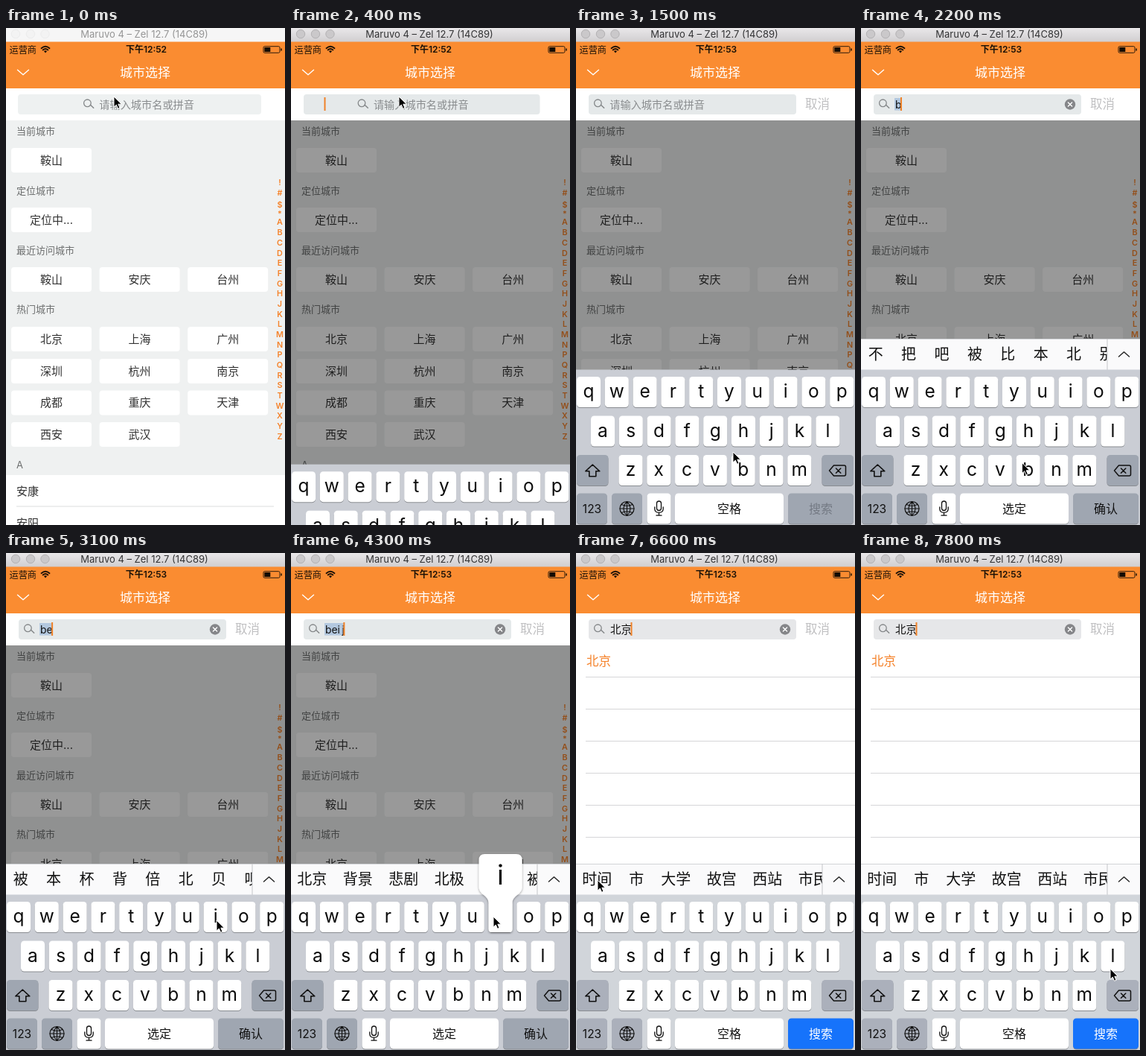
Write an HTML page that moves like this. It is 375 by 667 pixels and loops after 8 s.

```html
<!DOCTYPE html>
<html lang="zh-CN">
<head>
<meta charset="utf-8">
<title>城市选择</title>
<style>
html, body { margin: 0; width: 100%; height: 100%; overflow: hidden; background: #fff; }
svg { display: block; width: 375px; height: 667px; }
text { font-family: Inter, "Noto Sans CJK SC", "Noto Sans CJK", sans-serif; white-space: pre; }
</style>
</head>
<body>
<svg id="stage" viewBox="0 0 375 667">
  <defs>
    <linearGradient id="bar" x2="0" y2="1">
      <stop offset="0" stop-color="#e9e7e9"/><stop offset="1" stop-color="#d0ced0"/>
    </linearGradient>
    <clipPath id="candClip"><rect x="0" y="417" width="331" height="42"/></clipPath>
    <filter id="soft" x="-30%" y="-30%" width="160%" height="160%">
      <feDropShadow dx="0" dy="1" stdDeviation="1.6" flood-opacity=".4"/>
    </filter>
  </defs>
</svg>
<script>
const stage = document.getElementById('stage');
const LOOP = 8000, STEP = 100, FOCUS = 300, COMMIT = 6500;
const ORANGE = '#f5822a';

function el(tag, attrs, parent = stage) {
  const node = document.createElementNS('http://www.w3.org/2000/svg', tag);
  set(node, attrs);
  parent.appendChild(node);
  return node;
}
function set(node, attrs) {
  for (const k in attrs) node.setAttribute(k, attrs[k]);
}
const show = (node, on) => node.setAttribute('visibility', on ? 'visible' : 'hidden');
const group = (parent, attrs = {}) => el('g', attrs, parent);
const rect = (x, y, width, height, fill, parent, rx = 0) =>
  el('rect', { x, y, width, height, fill, rx }, parent);
const line = (d, stroke, width, parent) =>
  el('path', { d, stroke, 'stroke-width': width, fill: 'none', 'stroke-linecap': 'round', 'stroke-linejoin': 'round' }, parent);
// y is the visual centre of the line
function label(str, x, y, size, fill, parent, anchor = 'start', weight = 400) {
  const node = el('text', {
    x, y: y + size * 0.37, 'font-size': size, fill, 'text-anchor': anchor, 'font-weight': weight
  }, parent);
  node.textContent = str;
  return node;
}

// City list
const cities = group();
rect(0, 124, 375, 543, '#eff1f1', cities);
[['当前城市', 138], ['定位城市', 218], ['最近访问城市', 298], ['热门城市', 377.5], ['A', 586]]
  .forEach(([s, y]) => label(s, 14, y, 13, '#6c6e6e', cities));
[
  [161, '鞍山'], [241, '定位中...'], [321, '鞍山', '安庆', '台州'],
  [401, '北京', '上海', '广州'], [444, '深圳', '杭州', '南京'],
  [486.5, '成都', '重庆', '天津'], [529, '西安', '武汉']
].forEach(([y, ...names]) => names.forEach((name, i) => {
  const x = 7 + i * 118.6;
  rect(x, y, 108, 33, '#fff', cities, 4);
  label(name, x + 54, y + 16.4, 15, '#333', cities, 'middle');
}));
rect(0, 600, 375, 67, '#fff', cities);
rect(14, 641.5, 346, 1, '#dcdede', cities);
label('安康', 14, 621, 15, '#333', cities);
label('安阳', 14, 664, 15, '#333', cities);
const indexMark = (s, y) => label(s, 368, y, 10.8, ORANGE, cities, 'middle', 600);
[['!', 207], ['#', 221], ['$', 237], ['*', 249]].forEach(([s, y]) => indexMark(s, y));
[...'ABCDEFGHJKLMNPQRSTWXYZ'].forEach((s, i) => indexMark(s, 260.5 + i * 13.67));
const dim = rect(0, 124, 375, 543, '#000', cities);

// Search result
const results = group();
rect(0, 124, 375, 543, '#fff', results);
label('北京', 14, 145, 16.5, ORANGE, results);
for (let i = 0; i < 6; i++) rect(13, 166 + i * 43, 362, 1, '#d6d6d8', results);

// Title bar
const titleBar = rect(0, 0, 375, 19, '#f6f6f6');
const lights = [13, 33, 52.5].map(cx => el('circle', { cx, cy: 8, r: 5.7 }));
const titleText = label('Maruvo 4 – Zel 12.7 (14C89)', 186, 8.5, 13, '#999', stage, 'middle');

// Navigation bar
rect(0, 18.5, 375, 62.5, '#fa8c31');
label('运营商', 4.5, 29, 12.2, '#1c1208');
const clock = label('', 188.5, 29, 12, '#1c1208', stage, 'middle', 600);
line('M47.5 27.2Q53 22.4 58.5 27.2M49.6 29.5Q53 26.6 56.4 29.5', '#1c1208', 1.8);
el('path', { d: 'M50.9 31L53 33.4L55.1 31Q53 29.4 50.9 31Z', fill: '#1c1208' });
el('rect', { x: 346, y: 24.7, width: 22, height: 8.6, rx: 1.6, fill: 'none', stroke: '#2a1a0b' });
rect(347.3, 26, 8, 6, '#140c04');
rect(369.3, 27.2, 1.6, 3.6, '#2a1a0b', stage, 0.8);
line('M15.5 56.3L23 62.8L30.5 56.3', '#fff', 1.4);
label('城市选择', 187, 59.5, 17, '#fff', stage, 'middle', 300);

// Search bar
rect(0, 81, 375, 43, '#fff');
const field = rect(16, 89, 327, 27, '#eef1f1', stage, 4);
const hint = group();
line('M13.7 107.2L9.5 103.2', '#85888a', 1.5, hint);
el('circle', { cx: 5.4, cy: 100.8, r: 4.8, fill: 'none', stroke: '#85888a', 'stroke-width': 1.3 }, hint);
const placeholder = label('请输入城市名或拼音', 21.3, 102.5, 14.2, '#8a8d8f', hint);
const cancel = label('取消', 308, 102, 16.5, '#c0c0c2', stage, 'start', 300);
const marked = rect(45, 94, 0, 16.5, '#b3c8df');
const typed = label('', 46, 102.5, 13.9, '#111');
const caret = rect(44, 93, 2, 18, '#f08228');
const clear = group();
el('circle', { cx: 281, cy: 102.5, r: 7.2, fill: '#858689' }, clear);
line('M278.4 99.9L283.6 105.1M283.6 99.9L278.4 105.1', '#fff', 1.4, clear);

// Candidate bar
const candBar = group();
rect(0, 417, 375, 42, '#fafafb', candBar);
const candList = group(candBar, { 'clip-path': 'url(#candClip)' });
rect(0, 417, 375, 0.8, '#c9cbcf', candBar);
rect(330.5, 417, 1, 42, '#c4c6ca', candBar);
line('M346.5 441L353.5 434.7L360.5 441', '#222', 1.4, candBar);

// Keyboard
const keyboard = group();
const board = rect(0, 458.5, 375, 209, '#cbcfd5', keyboard);
function key(x, y, w, fill = '#fff') {
  rect(x, y + 1, w, 41, '#898c91', keyboard, 4.5);
  return rect(x, y, w, 41, fill, keyboard, 4.5);
}
const keyPos = {};
[['qwertyuiop', 1, 468], ['asdfghjkl', 20, 520.5], ['zxcvbnm', 57.5, 573]].forEach(([row, x0, y]) =>
  [...row].forEach((ch, i) => {
    const x = x0 + i * 37.8;
    keyPos[ch] = { x, y };
    key(x, y, 32);
    const t = label(ch, x + 16, 0, 24.5, '#0c0c0c', keyboard, 'middle');
    t.setAttribute('y', y + 28);
  }));
const darkKeys = [[1, 573, 42.5], [330.5, 573, 42.5], [1, 624.5, 41], [48, 624.5, 41]]
  .map(a => key(...a));
key(95.5, 624.5, 32);
key(133, 624.5, 146);
const returnKey = key(285, 624.5, 88);
line('M22.3 586L31.8 594.8H26.8V601.8H17.8V594.8H12.8Z', '#111', 1.6, keyboard);
line('M346.5 587H360.5Q362.5 587 362.5 589V599Q362.5 601 360.5 601H346.5L340.5 594ZM349.5 591L355.8 597.3M355.8 591L349.5 597.3', '#111', 1.5, keyboard);
label('123', 21.5, 645, 15.5, '#111', keyboard, 'middle');
el('circle', { cx: 68.5, cy: 645, r: 9.5, fill: 'none', stroke: '#111', 'stroke-width': 1.2 }, keyboard);
line('M68.5 635.5V654.5M59 645H78M61.2 639.5Q68.5 643 75.8 639.5M61.2 650.5Q68.5 647 75.8 650.5M68.5 635.5Q59.5 645 68.5 654.5Q77.5 645 68.5 635.5', '#111', 1.1, keyboard);
el('rect', { x: 108.5, y: 635, width: 6, height: 12.5, rx: 3, fill: 'none', stroke: '#111', 'stroke-width': 1.3 }, keyboard);
line('M105.8 643V645.5Q106 650.3 111.5 650.3T117.2 645.5V643M111.5 650.5V654M108 654.2H115', '#111', 1.3, keyboard);
const spaceText = label('', 206, 645, 16, '#111', keyboard, 'middle');
const returnText = label('', 329, 645, 16, '#111', keyboard, 'middle');

// Enlarged key under the finger, placed relative to the key's corner
const popup = group();
el('path', {
  d: 'M-5 -64H37Q45 -64 45 -56V-20C45 -9 32 -9 32 2V37Q32 41 28 41H4Q0 41 0 37V2C0 -9 -13 -9 -13 -20V-56Q-13 -64 -5 -64Z',
  fill: '#fff', filter: 'url(#soft)'
}, popup);
const popupText = label('', 16, 0, 37, '#0c0c0c', popup, 'middle');
popupText.setAttribute('y', -23);

const pointer = el('path', {
  d: 'M0 0V14.2L3.3 11.1L5.6 16.3L8 15.3L5.8 10.2H10.3Z',
  fill: '#000', stroke: '#fff', 'stroke-width': 1, 'stroke-linejoin': 'round'
});

// Key, press time, release time, resulting text, candidates
const presses = [
  ['b', 2000, 2150, 'b', '不 把 吧 被 比 本 北 别'],
  ['e', 2600, 2750, 'be', '被 本 杯 背 倍 北 贝 呗'],
  ['i', 3200, 3350, 'bei', '被 北 背 倍 杯 贝 备 悲'],
  ['j', 3800, 3950, 'bei\u2009j', '北京 背景 悲剧 北极 背脊 被'],
  ['i', 4200, 4400, 'bei\u2009ji', '北极 背脊 北京 背景 悲剧 被'],
  ['n', 4850, 5000, 'bei\u2009jin', '北京 北京市 背景 贝京 背静'],
  ['g', 5450, 5600, 'bei\u2009jing', '北京 北京市 背景 贝京 背静']
];
const following = '时间 市 大学 故宫 西站 市民';

// Time, x, y of the pointer tip
const path = [
  [0, 145, 92], [700, 145, 92], [1500, 211, 569], [1900, 222, 588], [2150, 222, 588],
  [2550, 92, 486], [2750, 92, 486], [3100, 283, 493], [3350, 283, 493], [3750, 262, 541],
  [3950, 262, 541], [4200, 272, 488], [4400, 272, 488], [4800, 262, 593], [5000, 262, 593],
  [5400, 192, 546], [5900, 192, 546], [6350, 29, 439], [6600, 29, 439], [7200, 335, 558], [8000, 335, 558]
];

const clamp = v => Math.max(0, Math.min(1, v));
const mix = (a, b, p) => a + (b - a) * p;
const smooth = u => u * u * (3 - 2 * u);
const easeOut = u => 1 - (1 - u) ** 2;

function pointerAt(t) {
  const i = Math.max(1, path.findIndex(p => p[0] > t));
  const [a, b] = [path[i - 1], path[i]];
  const p = smooth(clamp((t - a[0]) / (b[0] - a[0])));
  return [mix(a[1], b[1], p), mix(a[2], b[2], p)];
}

let shownWords = null;
function fillCandidates(words) {
  if (words === shownWords) return;
  shownWords = words;
  candList.replaceChildren();
  let x = -2.5;
  words.split(' ').forEach(word => {
    const w = word.length === 1 ? 44.4 : 20.5 + 20.5 * word.length;
    label(word, x + w / 2, 438, 20, '#111', candList, 'middle');
    x += w;
  });
}

function render(t) {
  const active = t >= 200, focused = t >= FOCUS, done = t >= COMMIT;
  const last = presses.filter(p => p[2] <= t).pop();
  const composing = !!last && !done;
  const text = done ? '北京' : last ? last[3] : '';

  titleBar.setAttribute('fill', active ? 'url(#bar)' : '#f6f6f6');
  titleText.setAttribute('fill', active ? '#333335' : '#959595');
  lights.forEach(c => set(c, { fill: active ? '#cac8ca' : '#f3f3f3', stroke: active ? '#b3b1b3' : '#ececec' }));
  clock.textContent = t < 1000 ? '下午12:52' : '下午12:53';

  show(cities, !done);
  show(results, done);
  dim.setAttribute('opacity', 0.4 * clamp((t - 200) / 150));

  const slide = smooth(clamp((t - FOCUS) / 370));
  const left = focused ? 17 : 16;
  set(field, {
    x: left, width: mix(343, 296, slide) - left,
    fill: done ? '#e6e7e9' : focused ? '#e5e9ea' : '#eef1f1'
  });
  hint.setAttribute('transform', `translate(${mix(104, 24, slide)} 0)`);
  show(placeholder, !text);
  set(cancel, { x: mix(346, 308, slide), opacity: clamp(slide * 1.5 - 0.4) });

  typed.textContent = text;
  typed.setAttribute('font-size', done ? 14.5 : 13.9);
  const width = text ? typed.getComputedTextLength() : 0;
  marked.setAttribute('width', composing ? width + 1 : 0);
  const since = done ? COMMIT : last ? last[2] : 0;
  caret.setAttribute('x', 44.5 + width);
  show(caret, focused && (t - since) % 1000 < 500);
  show(clear, !!text);

  show(candBar, !!text);
  if (text) fillCandidates(done ? following : last[4]);

  const rise = easeOut(clamp((t - 345) / 250));
  keyboard.setAttribute('transform', `translate(0 ${mix(209, 0, rise)})`);
  board.setAttribute('fill', done ? '#d1d5da' : '#cacdd4');
  const dark = done ? '#abb0bb' : '#9fa6b1';
  darkKeys.forEach(k => k.setAttribute('fill', dark));
  returnKey.setAttribute('fill', done ? '#1673fb' : dark);
  spaceText.textContent = composing ? '选定' : '空格';
  returnText.textContent = composing ? '确认' : '搜索';
  returnText.setAttribute('fill', done ? '#fff' : composing ? '#111' : '#747a84');

  const held = presses.find(p => p[1] <= t && t < p[2]);
  show(popup, !!held);
  if (held) {
    const { x, y } = keyPos[held[0]];
    popup.setAttribute('transform', `translate(${x} ${y})`);
    popupText.textContent = held[0];
  }
  pointer.setAttribute('transform', `translate(${pointerAt(t)})`);
}

const start = performance.now();
function tick() {
  const t = (performance.now() - start) % LOOP;
  render(Math.floor(t / STEP) * STEP);
  requestAnimationFrame(tick);
}
tick();
</script>
</body>
</html>
```
